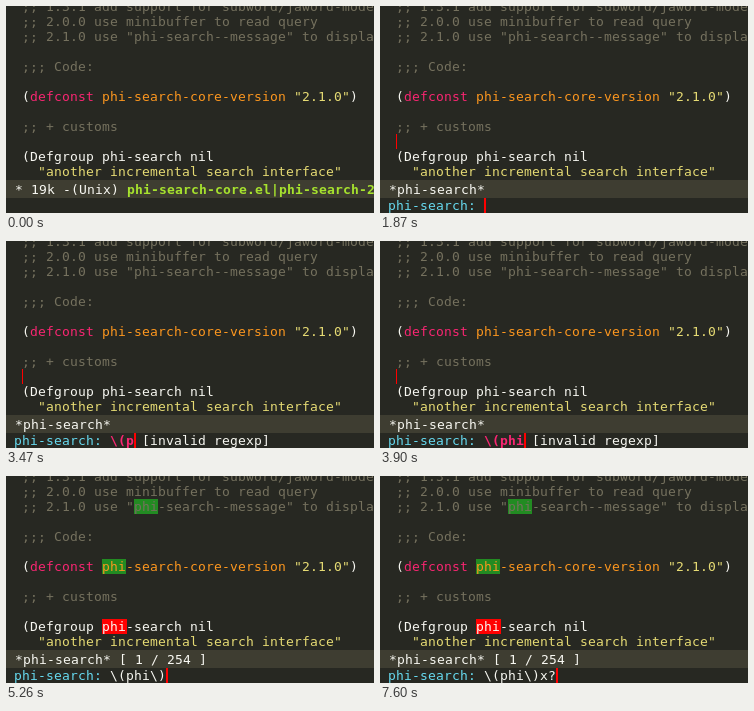
An HTML page that plays this animation: 368 by 207 pixels, repeating every 8000 ms.

```html
<!DOCTYPE html>
<html lang="en">
<head>
<meta charset="utf-8">
<title>Incremental search</title>
<style>
  html, body { margin: 0; width: 100%; height: 100%; overflow: hidden; background: #272822; }
  #stage {
    position: absolute; left: 0; top: 0; width: 368px; height: 207px; overflow: hidden;
    background: #272822; color: #f8f8f2;
    font: 13px/15px "DejaVu Sans Mono", monospace;
    letter-spacing: calc(8px - 1ch); /* whole-pixel character cells */
    font-variant-ligatures: none;
  }
  .row { position: absolute; left: 16px; height: 15px; white-space: pre; }
  .comment { color: #75715e; }
  .key { color: #f92672; }
  .var { color: #fd971f; }
  .str { color: #e6db74; }
  .file { color: #a6e22e; font-weight: bold; }
  .prompt { color: #66d9ef; }
  .bad { color: #f92672; font-weight: bold; }
  .hit .match { background: #228b22; }
  .hit .current { background: #f00; }
  .match, .current { display: inline-block; height: 15px; vertical-align: top; }
  #bar { position: absolute; left: 0; top: 174px; width: 368px; height: 18px; background: #3e3d31; }
  #bar .row { left: 1px; top: 2px; }
  #mini { left: 8px; top: 192px; }
  .cursor { position: absolute; width: 2px; height: 15px; background: #f00; }
  #caret { top: 192px; }
</style>
</head>
<body>
<div id="stage">
  <div class="row comment" style="top:-7px">;; 1.3.1 add support for subword/jaword-mode</div>
  <div class="row comment" style="top:8px">;; 2.0.0 use minibuffer to read query</div>
  <div class="row comment" style="top:23px">;; 2.1.0 use "<span class="match">phi</span>-search--message" to displa</div>
  <div class="row comment" style="top:53px">;;; Code:</div>
  <div class="row" style="top:83px">(<span class="key">defconst</span> <span class="var"><span class="match">phi</span>-search-core-version</span> <span class="str">"2.1.0"</span>)</div>
  <div class="row comment" style="top:113px">;; + customs</div>
  <div class="row" style="top:143px">(Defgroup <span class="current">phi</span>-search nil</div>
  <div class="row str" style="top:158px">  "another incremental search interface"</div>
  <div id="bar">
    <div class="row" id="fileBar"> * 19k -(Unix) <span class="file">phi-search-core.el|phi-search-2</span></div>
    <div class="row" id="searchBar"></div>
  </div>
  <div class="row" id="mini"><span class="prompt">phi-search: </span><span id="good"></span><span class="bad" id="bad"></span><span id="note"></span></div>
  <div class="cursor" id="point"></div>
  <div class="cursor" id="caret"></div>
</div>
<script>
const LOOP = 8000, SEARCH = 1870, CELL = 8, QUERY_X = 104;
const HOME = [16, 128], MATCH_END = [120, 143];
const NOTE = ' [invalid regexp]';

// time, cursor visible, accepted query, rejected query, note
const steps = [
  [0, 0, '', '', ''],
  [280, 1, '', '', ''],
  [840, 0, '', '', ''],
  [1280, 1, '', '', ''],
  [SEARCH, 1, '', '', ''],
  [2330, 0, '', '', ''],
  [2480, 1, '', '\\', NOTE],
  [3040, 0, '', '\\', NOTE],
  [3190, 1, '', '\\(', NOTE],
  [3470, 1, '', '\\(p', NOTE],
  [3620, 1, '', '\\(ph', NOTE],
  [3900, 1, '', '\\(phi', NOTE],
  [4450, 1, '', '\\(phi\\', NOTE],
  [5010, 0, '', '\\(phi\\', NOTE],
  [5260, 1, '\\(phi\\)', '', ''],
  [5780, 0, '\\(phi\\)', '', ''],
  [6060, 1, '\\(phi\\)', 'x', ''],
  [6610, 0, '\\(phi\\)', 'x', ''],
  [7170, 1, '\\(phi\\)', 'x', ''],
  [7600, 1, '\\(phi\\)x?', '', '']
];

const el = id => document.getElementById(id);
const show = (id, on) => { el(id).style.visibility = on ? 'visible' : 'hidden'; };
const place = (id, x, y) => {
  el(id).style.left = x + 'px';
  el(id).style.top = y + 'px';
};
let last = null;

function draw(step) {
  const [time, blink, good, bad, note] = step;
  const searching = time >= SEARCH;
  const hit = good !== '' && bad === '';

  el('stage').classList.toggle('hit', hit);
  show('fileBar', !searching);
  show('searchBar', searching);
  el('searchBar').textContent = ' *phi-search*' + (hit ? ' [ 1 / 254 ]' : '');

  show('mini', searching);
  el('good').textContent = good;
  el('bad').textContent = bad;
  el('note').textContent = note;

  // A blinking block while editing, a steady thin bar while searching
  place('point', ...(hit ? MATCH_END : HOME));
  el('point').style.width = (searching ? 1 : CELL) + 'px';
  show('point', searching || blink);

  place('caret', QUERY_X + CELL * (good + bad).length, 192);
  show('caret', searching && blink);
}

const start = performance.now();
function tick(now) {
  const t = Math.max(0, now - start) % LOOP;
  const step = steps.findLast(s => s[0] <= t);
  if (step !== last) draw(last = step);
  requestAnimationFrame(tick);
}
tick(start);
</script>
</body>
</html>
```
